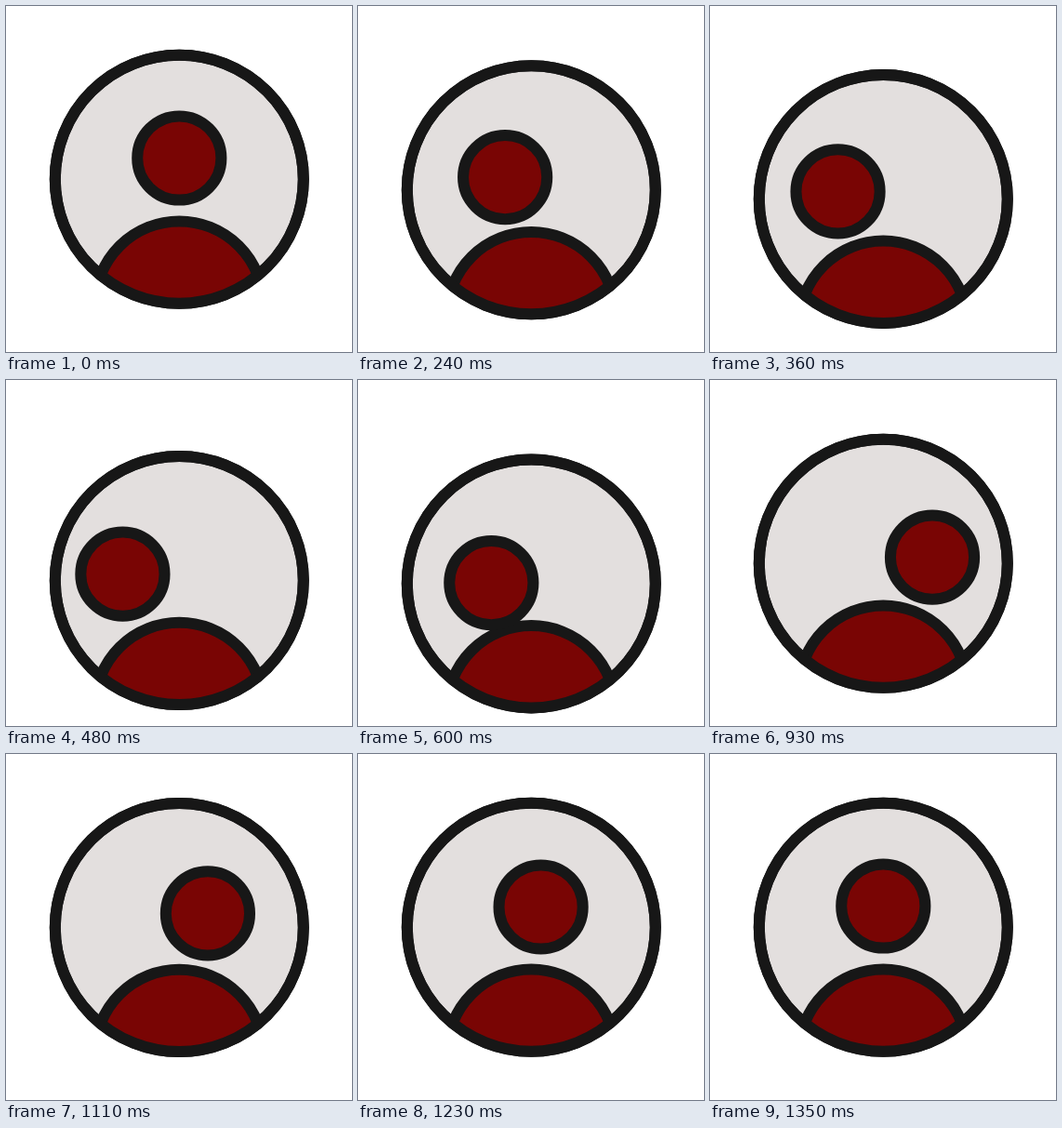
Recreate the animation shown at these times as an HTML page. Size 372x372 px, loop 1800 ms.

```html
<!DOCTYPE html>
<html lang="en">
<head>
<meta charset="utf-8">
<title>Avatar nod</title>
<style>
  html, body { margin: 0; width: 100%; height: 100%; overflow: hidden; background: #fff; }
  svg { display: block; width: 372px; height: 372px; }
  .skin { fill: #790504; }
  circle { stroke: #171717; stroke-width: 12; }
</style>
</head>
<body>
<svg viewBox="0 0 372 372">
  <clipPath id="disc"><circle cx="186.3" cy="186.2" r="133.5"/></clipPath>
  <g id="badge">
    <circle cx="186.3" cy="186.2" r="133.5" fill="#e3dfde"/>
    <g clip-path="url(#disc)"><circle class="skin" cx="186.3" cy="322" r="90.6"/></g>
    <circle cx="186.3" cy="186.2" r="133.5" fill="none"/>
  </g>
  <circle id="head" class="skin" cx="186.3" cy="163.5" r="45.1"/>
</svg>
<script>
const LOOP = 1800, STEP = 30, DROP = 32.7;
const badge = document.getElementById('badge');
const head = document.getElementById('head');

// Head offsets: start time, end time, then start, control and end points.
const headPath = [
  [0, 510, [0, 0], [-31, 22.3], [-61.5, 45.6]],
  [510, 870, [-61.5, 45.6], [-2, 81], [54.5, 29.5]],
  [870, 1350, [54.5, 29.5], [34, 1], [0, 0]]
];

function ease(time, from, to) {
  const u = Math.min(1, Math.max(0, (time - from) / (to - from)));
  return u * u * (3 - 2 * u);
}

function headOffset(time) {
  const [from, to, a, b, c] = headPath.find(part => time < part[1]) || headPath[2];
  const u = ease(time, from, to), v = 1 - u;
  return [0, 1].map(i => v * v * a[i] + 2 * u * v * b[i] + u * u * c[i]);
}

function draw(now) {
  const time = Math.floor((now % LOOP) / STEP) * STEP;
  const drop = DROP * (ease(time, 0, 600) - ease(time, 600, 1140));
  badge.setAttribute('transform', `translate(0 ${drop})`);
  head.setAttribute('transform', `translate(${headOffset(time)})`);
}

const start = performance.now();
function tick() {
  draw(performance.now() - start);
  requestAnimationFrame(tick);
}
tick();
</script>
</body>
</html>
```
